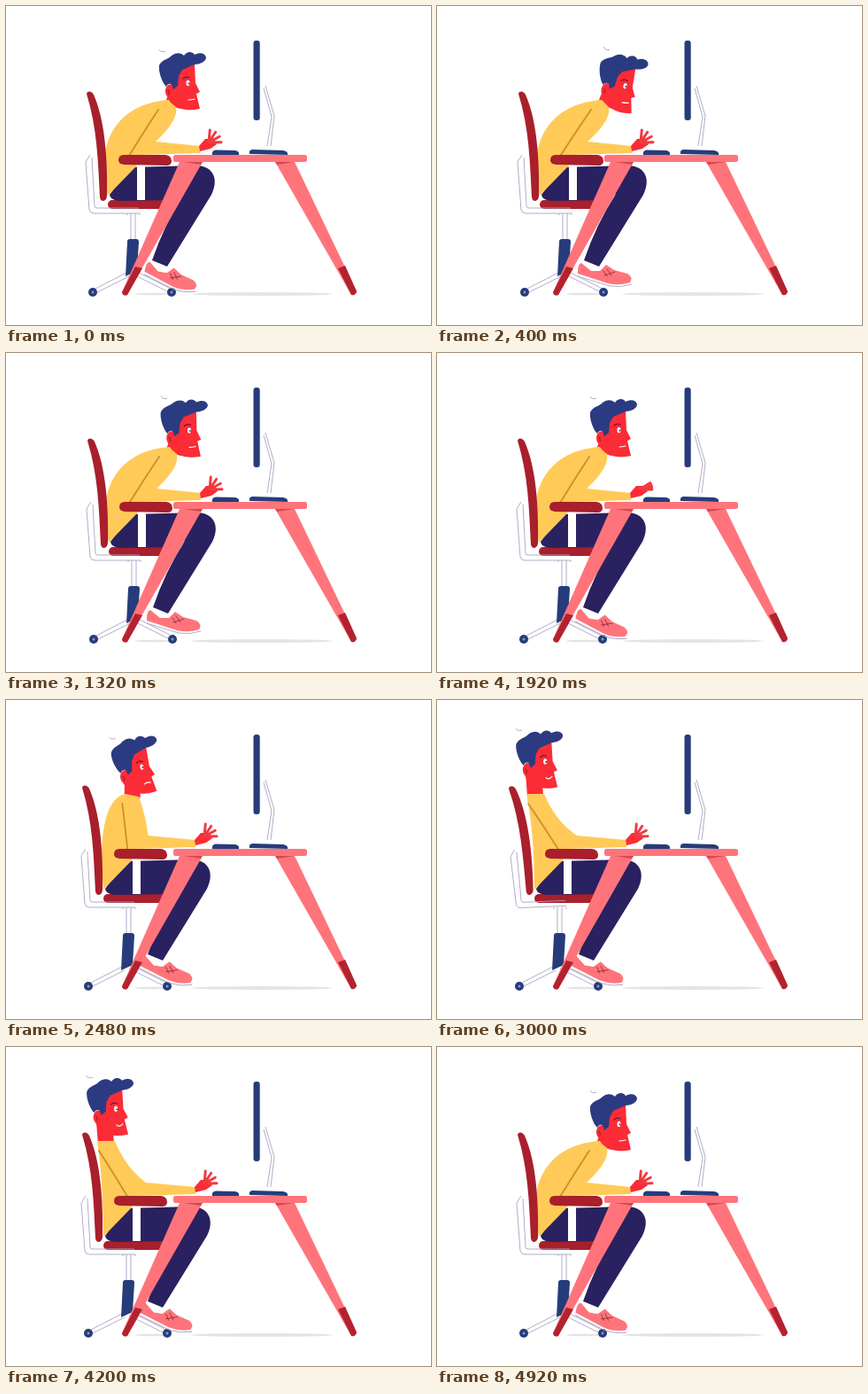
An HTML page for the animation above (5000 ms loop, 480 by 360 pixels).

```html
<!DOCTYPE html>
<html lang="en">
<head>
<meta charset="utf-8">
<title>At the desk</title>
<style>
  html, body { margin: 0; width: 100%; height: 100%; overflow: hidden; background: #fff; }
  svg { display: block; width: 100vw; height: 100vh; }
  .navy { fill: #263c7a; }
  .trousers { fill: #2a2160; }
  .maroon { fill: #a91f2c; }
  .pink { fill: #ff747b; }
  .skin { fill: #fb2c36; }
  .yellow { fill: #ffca57; }
  .line { fill: none; stroke-linecap: round; stroke-linejoin: round; }
  .wire { fill: none; stroke: #a9a4c2; stroke-width: .9; }
</style>
</head>
<body>
<svg viewBox="0 0 480 360">
  <g fill="#e5e3e3">
    <ellipse cx="289" cy="325" rx="80" ry="2"/>
    <ellipse cx="166" cy="325" rx="20" ry="1.3"/>
  </g>

  <g id="screen">
    <path class="wire" d="M293 90L303 124L299 158M291 93L300 125L295 158"/>
    <rect class="navy" x="279.500" y="39" width="7.200" height="90" rx="3"/>
  </g>

  <g class="seated">
    <path class="wire" d="M141 234V264M146 234V264M137 234V236M151 234V236"/>
    <path class="wire" d="M136 301L101 319M139 305L103 323M148 300L184 318M144 303L182 322"/>
    <path class="navy" d="M137 266Q137 263 140 263H147Q150 263 150 266L148 299L135 305Z"/>
    <g id="caster">
      <circle class="navy" cx="98" cy="323" r="5"/>
      <circle fill="#8d96b8" cx="98" cy="323" r="1.500"/>
    </g>
    <use href="#caster" x="89"/>
    <rect class="maroon" x="115" y="219" width="75" height="10" rx="5"/>
    <g id="foot">
      <path fill="#fff" d="M165 285L182 288L181 299L162 296Z"/>
      <path class="pink" d="M162 290C158 291 158 298 158 302L192 313Q205 316 217 312Q221 306 214 302L199 298L190 292L183 299L173 299Z"/>
      <path class="wire" d="M158 305L194 316Q206 318 219 314"/>
      <path class="line" stroke="#8f2836" stroke-width=".8" d="M187 299L191 305M191 297L196 304M188 304L200 300"/>
    </g>
    <path class="trousers" d="M117 213L140 182L215 180C236 181 240 197 232 213L182 294L165 287Q179 246 201 212L190 219L132 220C125 220 118 219 117 213Z"/>
  </g>

  <path id="neck" stroke="#fb2c36" stroke-width="18"/>
  <path id="torso" class="yellow"/>
  <path id="sleeve" class="line" stroke="#cc8f2c" stroke-width="1.800"/>

  <g class="seated">
    <g id="backrest">
      <path class="wire" d="M95 168L90 176L94 230Q95 234 99 234H151M97 171L100 226Q100 228 103 228H150"/>
      <path class="maroon" d="M91 99C92 95 97 96 99 100C112 129 115 175 114 215C113 221 107 222 106 216C104 175 103 138 91 99Z"/>
    </g>
  </g>

  <g id="head">
    <path class="wire" d="M173 49Q175 53 180 51"/>
    <path class="skin" d="M190 74L213 65L214 87L219 97L215 99L219 116C205 119 195 117 186 109L182 102C178 97 180 88 187 88Z"/>
    <path fill="#2b3b81" d="M181 91C176 86 172 74 173 67C176 60 184 60 187 56C194 51 199 54 201 56C205 50 211 52 213 55C219 52 225 53 226 58C226 63 218 66 213 66L199 72L195 79L194 90L189 94L187 88Q183 87 181 91Z"/>
    <path class="line" stroke="#a91f2c" stroke-width="1.200" d="M183 95Q185 97 184 100"/>
    <path class="line" stroke="#6a1c40" stroke-width="1.300" d="M200 82Q203 79 207 81"/>
    <ellipse cx="205.500" cy="87" rx="2" ry="3.200" fill="#fff"/>
    <circle cx="206.500" cy="87.500" r=".9" fill="#2a2160"/>
    <path id="mouth" class="line" stroke="#fff" stroke-width="1.200"/>
  </g>

  <g class="seated">
    <path class="skin" d="M218 158L225 150L235 150L238 156L231 161L219 164Z"/>
    <path id="fingers" class="line" stroke="#f03a42" stroke-width="3"/>
    <rect x="148" y="179" width="9" height="40" fill="#fff"/>
    <path class="maroon" d="M133 168H180Q187 169 187 175Q187 180 181 180L133 179Q127 178 127 174Q127 168 133 168Z"/>
  </g>

  <g id="desk">
    <path class="navy" d="M233 168Q232 163 237 162.500L259 163Q264 164 263 168ZM275 167Q274 162 279 162L313 163Q319 164 318 168Z"/>
    <path class="pink" d="M196 176H222L153 297L137 326Q132 328 131 323ZM304 176H326L396 322Q395 327 390 326Z"/>
    <path fill="#b3232f" d="M146 294L154 296L137 326Q132 328 131 323ZM375 296L383 293L396 322Q395 327 390 326Z"/>
    <path fill="#d64850" d="M201 176H222L220 179ZM304 176H326L306 179Z"/>
    <rect class="pink" x="189" y="168" width="151" height="8" rx="2.500"/>
  </g>
</svg>

<script>
const LOOP = 5000, TAP = 400;
const el = id => document.getElementById(id);
const seated = document.querySelectorAll(".seated");

// neck: x of the collar; bend: roundness of the back; turn, recline, toes: degrees
const hunched = { neck: 184, bend: 1, turn: 0, chair: 0, recline: 0, toes: 10, smile: 0 };
const nodding = { ...hunched, neck: 186, turn: 12, chair: 1, toes: 0 };
const glancing = { ...nodding, neck: 185, turn: 1 };
const upright = { ...hunched, neck: 135, bend: .4, turn: -7, chair: -5, toes: 9, smile: -1.5 };
const leaning = { ...upright, neck: 103, bend: 0, turn: -1, smile: 2.5 };
const reclining = { ...leaning, neck: 101, recline: -2.5 };

const keys = [
  [0, hunched], [60, hunched], [360, nodding], [1080, nodding], [1300, glancing],
  [1500, glancing], [1750, hunched], [2200, hunched], [2480, upright], [2760, leaning],
  [2960, reclining], [3250, leaning], [4250, leaning], [4520, upright], [4780, hunched], [LOOP, hunched]
];

const ease = k => k * k * (3 - 2 * k);

function poseAt(t) {
  const i = keys.findIndex(([time]) => time > t);
  const [t0, a] = keys[i - 1], [t1, b] = keys[i];
  const k = ease((t - t0) / (t1 - t0));
  return Object.fromEntries(Object.keys(a).map(name => [name, a[name] + (b[name] - a[name]) * k]));
}

const shape = (id, d) => el(id).setAttribute("d", d);
const move = (node, transform) => node.setAttribute("transform", transform);

function drawBody({ neck, bend, chair }, lift) {
  const nape = 106, hip = 115 + chair;
  const throat = [neck + 20 - 12 * bend, nape + 8 * bend];
  const chest = [throat[0] + 12 - 9 * bend, throat[1] + 30 - 15 * bend];
  shape("torso", `M${neck} ${nape}C${neck - 48 * bend} ${nape + 3} ${hip - 17 * bend} 142 ${hip} 214` +
    `L${hip + 32} 181L${hip + 37} 168L${hip + 104} 166V158` +
    `L${hip + 48 + 6 * bend} 153Q${chest} ${throat}Z`);

  const shoulder = neck + 2 - 14 * bend, elbow = 139 + chair / 3;
  shape("sleeve", `M${shoulder} 117Q${(shoulder + elbow) / 2} 142 ${elbow} 169`);
  shape("neck", `M${neck + 8} ${102 + lift}L${neck + 10 - 6 * bend} ${nape + 3 + 4 * bend}`);
}

// Fingers fan out from the palm and flatten once per tap.
function drawFingers(t) {
  const press = ease(Math.max(0, 1 - Math.abs(t % TAP - 310) / 85));
  let d = "";
  for (let i = 0; i < 4; i++) {
    const angle = (-1.48 + .49 * i) * (1 - .65 * press);
    d += `M229 154L${229 + 14 * Math.cos(angle)} ${154 + 14 * Math.sin(angle)}`;
  }
  shape("fingers", d);
}

function draw(t) {
  const p = poseAt(t);
  const lift = (p.neck - 184) * .21;
  drawBody(p, lift);
  drawFingers(t);
  move(el("head"), `translate(${p.neck - 184} ${lift}) rotate(${p.turn} 195 112)`);
  move(el("backrest"), `rotate(${p.recline} 110 222)`);
  move(el("foot"), `rotate(${p.toes} 170 292)`);
  seated.forEach(part => move(part, `translate(${p.chair})`));
  shape("mouth", `M206 ${106 - p.smile / 3}Q209 ${106 + p.smile} 213 ${105 - p.smile / 3}`);
}

function frame() {
  draw(performance.now() % LOOP);
  requestAnimationFrame(frame);
}
frame();
</script>
</body>
</html>
```
